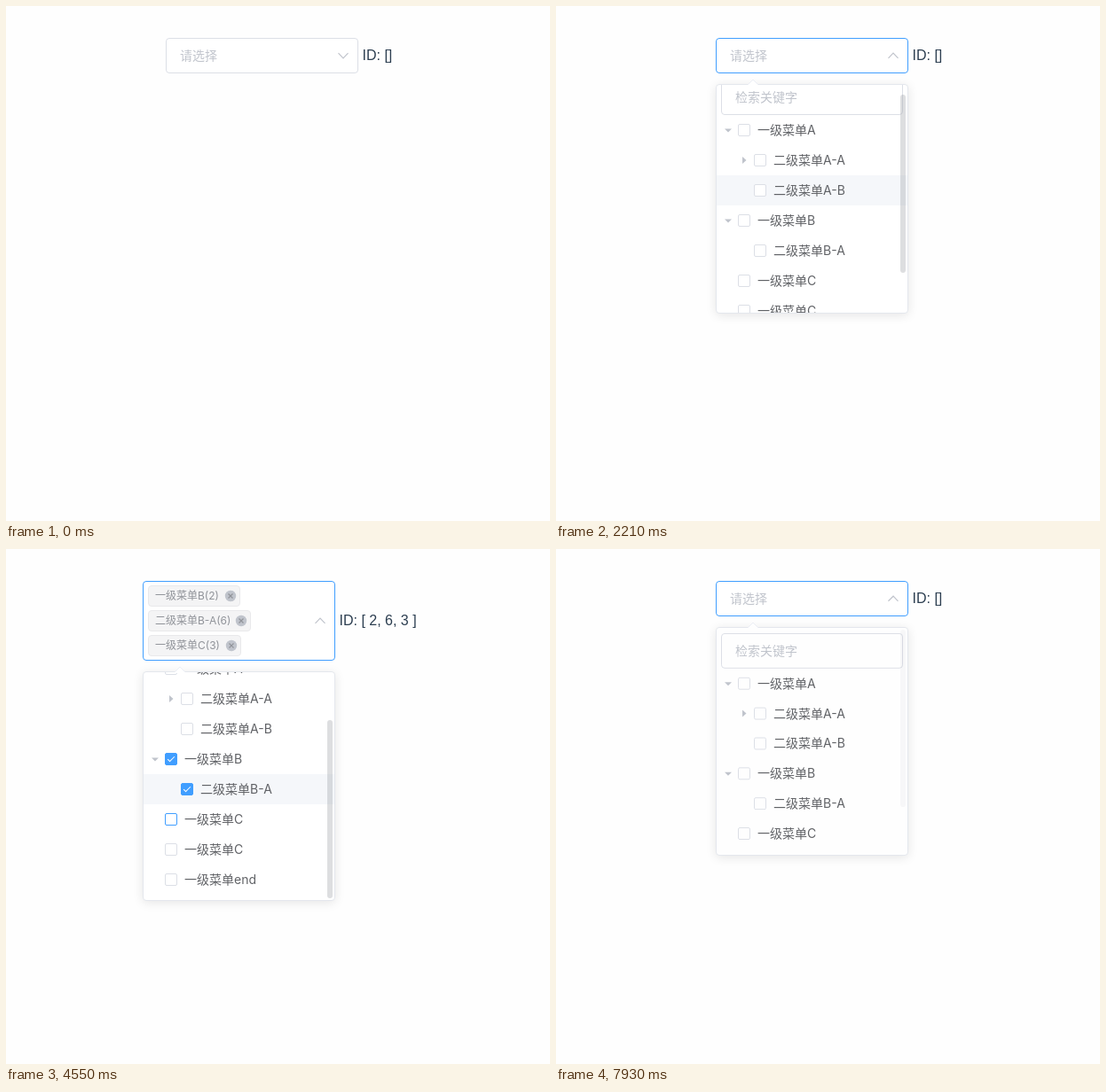
Animation of 613x581 px, one loop 8 s. Source, as an HTML page:

```html
<!DOCTYPE html>
<html lang="zh-CN">
<head>
<meta charset="utf-8">
<style>
  * { box-sizing: border-box; }
  html, body { margin: 0; width: 100%; height: 100%; overflow: hidden; background: #fefefe; }
  body { position: relative; font: 14px Inter, "Noto Sans CJK SC", "Noto Sans CJK", sans-serif; white-space: nowrap; }
  div, svg, i { position: absolute; }
  svg { overflow: visible; fill: none; }
  .field { border: 1px solid #dcdfe6; border-radius: 4px; background: #fff; }
  .hint { color: #c0c4cc; line-height: 38px; left: 15px; top: 0; }
  #select { top: 36px; width: 217px; }
  #label { top: 36px; font: 16px "Liberation Sans", Arial, sans-serif; color: #2c3e50; }
  .tag { left: 5px; height: 24px; border: 1px solid #e9e9eb; border-radius: 4px; background: #f4f4f5;
         color: #909399; font-size: 12px; line-height: 22px; padding-left: 7px; }
  .tag svg { right: 9px; top: 11px; }
  #popper { width: 217px; height: 259px; border: 1px solid #e4e7ed; border-radius: 4px; background: #fff;
            box-shadow: 0 2px 12px rgba(0, 0, 0, .1); transform-origin: center top; }
  #view { inset: 0; overflow: hidden; border-radius: 3px; }
  #list { left: 0; top: 0; width: 215px; }
  #search { left: 5px; top: 6px; width: 205px; height: 40px; }
  .row { width: 215px; height: 34px; line-height: 34px; color: #606266; }
  .box { top: 10px; width: 14px; height: 14px; border: 1px solid; border-radius: 2px; }
  .box i { box-sizing: content-box; left: 4px; top: 1px; width: 3px; height: 7px;
           border: solid #fff; border-width: 0 1px 1px 0; }
  #thumb { left: 207px; width: 6px; height: 201px; border-radius: 3px; background: rgba(144, 147, 153, .3); }
  #tip { left: 41px; top: -1px; }
</style>
</head>
<body>
<div id="select" class="field">
  <div id="empty" class="hint">请选择</div>
  <div id="tags"></div>
  <svg id="caret" width="1" height="1"><path d="M-5.5 2.8L0-2.8 5.5 2.8" stroke="#c0c4cc" stroke-width="1.2"/></svg>
  <svg id="clear" width="1" height="1"><path d="M-6 0a6 6 0 1 0 12 0a6 6 0 1 0-12 0M-2.2-2.2l4.4 4.4M2.2-2.2l-4.4 4.4" stroke="#c0c4cc"/></svg>
</div>
<div id="label"></div>
<div id="popper">
  <div id="view">
    <div id="list"><div id="search" class="field"><div class="hint">检索关键字</div></div></div>
    <div id="thumb"></div>
  </div>
  <svg id="tip" width="1" height="1"><path d="M-6 1L0-5 6 1" fill="#fff" stroke="#ebeef5"/><path d="M-5 1h10v1h-10z" fill="#fff"/></svg>
</div>
<script>
const LOOP = 8000, STEP = 130, BLUE = '#409eff';
const $ = id => document.getElementById(id);
const clamp = x => Math.min(1, Math.max(0, x));

// CSS-style cubic-bezier easing, solved by bisection
const bezier = (x1, y1, x2, y2) => x => {
  if (x <= 0 || x >= 1) return clamp(x);
  const curve = (a, b, s) => 3 * (1 - s) * s * ((1 - s) * a + s * b) + s ** 3;
  let lo = 0, hi = 1;
  for (let i = 0; i < 24; i++) {
    const mid = (lo + hi) / 2;
    if (curve(x1, x2, mid) < x) lo = mid; else hi = mid;
  }
  return curve(y1, y2, lo);
};
const ease = bezier(.25, .1, .25, 1), easeIn = bezier(.42, 0, 1, 1), easeOut = bezier(0, 0, .58, 1);
const easeInOut = bezier(.42, 0, .58, 1), zoom = bezier(.23, 1, .32, 1), back = bezier(.71, -.46, .29, 1.46);

const ramp = (t, start, length, fn) => fn((t - start) / length);
const at = (t, keys) => keys.filter(k => k[0] <= t).pop()[1];
const during = (t, a, b) => t >= a && t < b;
const mix = (from, to, p) => `color-mix(in srgb, ${to} ${clamp(p) * 100}%, ${from})`;

const CLEAR = 6969, HIDDEN = 7400;
const tagCounts = [[0, 0], [3490, 2], [4510, 3], [5840, 2], [CLEAR, 0]];
const popperCounts = [...tagCounts.slice(0, 4), [HIDDEN, 0]];
const hovers = [[0, -1], [1530, 1], [1660, 2], [2700, 4], [3490, 3], [4010, 4], [4140, 5],
                [4510, 4], [4920, 3], [5050, 2], [5180, -1]];
const lefts = { 0: 180, 2: 163, 3: 154 };
const heights = { 0: 40, 2: 62, 3: 90 };
const ids = { 0: '[]', 2: '[ 2, 6 ]', 3: '[ 2, 6, 3 ]' };
const checks = { 3: [3490, HIDDEN], 4: [3490, HIDDEN], 5: [4510, 5840] };
const boxHovers = { 4: [3230, 3770], 5: [4270, 4810] };

// label, depth, expander
const items = [['一级菜单A', 0, 'down'], ['二级菜单A-A', 1, 'right'], ['二级菜单A-B', 1], ['一级菜单B', 0, 'down'],
               ['二级菜单B-A', 1], ['一级菜单C', 0], ['一级菜单C', 0], ['一级菜单end', 0]];
const expanders = { down: 'M-4-1.5h8l-4 4z', right: 'M-2-4v8l4.5-4z' };

const add = (parent, className, html) => {
  const el = document.createElement('div');
  el.className = className;
  el.innerHTML = html;
  return parent.appendChild(el);
};

const tags = [['一级菜单B(2)', 104], ['二级菜单B-A(6)', 116], ['一级菜单C(3)', 105]].map(([text, width], i) => {
  const el = add($('tags'), 'tag', text + `<svg width="1" height="1"><circle r="6.2" fill="#c0c4cc"/>
    <path d="M-2.5-2.5l5 5M2.5-2.5l-5 5" stroke="#909399" stroke-width="1.2"/></svg>`);
  el.style.cssText = `width:${width}px;top:${4 + 28 * i}px`;
  return el;
});

const rows = items.map(([text, depth, expander], i) => {
  const x = 24 + 18 * depth;
  const row = add($('list'), 'row', `<div style="left:${x + 22}px">${text}</div>` + (expander
    ? `<svg style="left:${x - 11.5}px;top:17px" width="1" height="1"><path d="${expanders[expander]}" fill="#c0c4cc"/></svg>` : ''));
  row.style.top = 46 + 34 * i + 'px';
  const box = add(row, 'box', '<i></i>');
  box.style.left = x + 'px';
  return { row, box, mark: box.firstChild };
});

function drawSelect(t) {
  const n = at(t, tagCounts), left = lefts[n], height = heights[n], s = $('select').style;
  s.left = left + 'px';
  s.height = height + 'px';
  const idle = mix('#dcdfe6', '#c0c4cc', ramp(t, 600, 200, ease));
  s.borderColor = mix(idle, BLUE, ramp(t, 1010, 200, ease));
  $('empty').hidden = n > 0;
  tags.forEach((tag, i) => tag.hidden = i >= n);

  const clearing = during(t, 5570, 5840) || during(t, 6350, CLEAR);
  const turn = t < CLEAR ? ramp(t, 1010, 300, ease) : ramp(t, 7660, 300, ease);
  for (const id of ['caret', 'clear']) {
    $(id).style.left = '198.5px';
    $(id).style.top = height / 2 - 1 + 'px';
    $(id).style.display = (id === 'clear') === clearing ? '' : 'none';
  }
  $('caret').firstChild.setAttribute('transform', `rotate(${180 - 180 * turn})`);

  $('label').textContent = 'ID: ' + ids[n];
  $('label').style.left = left + 221.5 + 'px';
  $('label').style.lineHeight = height - 1 + 'px';
}

function drawPopper(t) {
  const n = at(t, popperCounts), s = $('popper').style;
  const open = t < HIDDEN
    ? ramp(t, 1020, 300, zoom) - ramp(t, CLEAR, 300, zoom)
    : ramp(t, 7715, 300, zoom);
  s.left = lefts[n] + 'px';
  s.top = 48 + heights[n] + 'px';
  s.opacity = open;
  s.transform = `scaleY(${open})`;

  const scroll = t < HIDDEN ? ramp(t, 2160, 170, easeInOut) : 0;
  $('list').style.top = -67 * scroll + 'px';
  $('thumb').style.top = 2 + 52 * scroll + 'px';
  $('thumb').style.opacity = ramp(t, 1530, 340, easeOut) - ramp(t, 5090, 120, easeOut) + ramp(t, 7880, 340, easeOut);

  const hover = at(t, hovers);
  rows.forEach(({ row, box, mark }, i) => {
    row.style.background = i === hover ? '#f5f7fa' : '';
    const [on, off] = checks[i] || [LOOP, LOOP];
    const live = t < HIDDEN;
    const fill = live ? ramp(t, on, 250, back) - ramp(t, off, 250, back) : 0;
    const tick = live ? ramp(t, on + 50, 150, easeIn) - ramp(t, off + 50, 150, easeIn) : 0;
    const [from, to] = boxHovers[i] || [LOOP, LOOP];
    const touched = during(t, from, to) ? 1 : 0;
    box.style.background = mix('#fff', BLUE, fill);
    box.style.borderColor = mix('#dcdfe6', BLUE, Math.max(fill, touched));
    mark.style.transform = `rotate(45deg) scaleY(${tick})`;
    mark.style.opacity = tick > 0 ? 1 : 0;
  });
}

const begin = performance.now();
function frame() {
  const t = Math.floor(((performance.now() - begin) % LOOP) / STEP) * STEP;
  drawSelect(t);
  drawPopper(t);
  requestAnimationFrame(frame);
}
frame();
</script>
</body>
</html>
```
